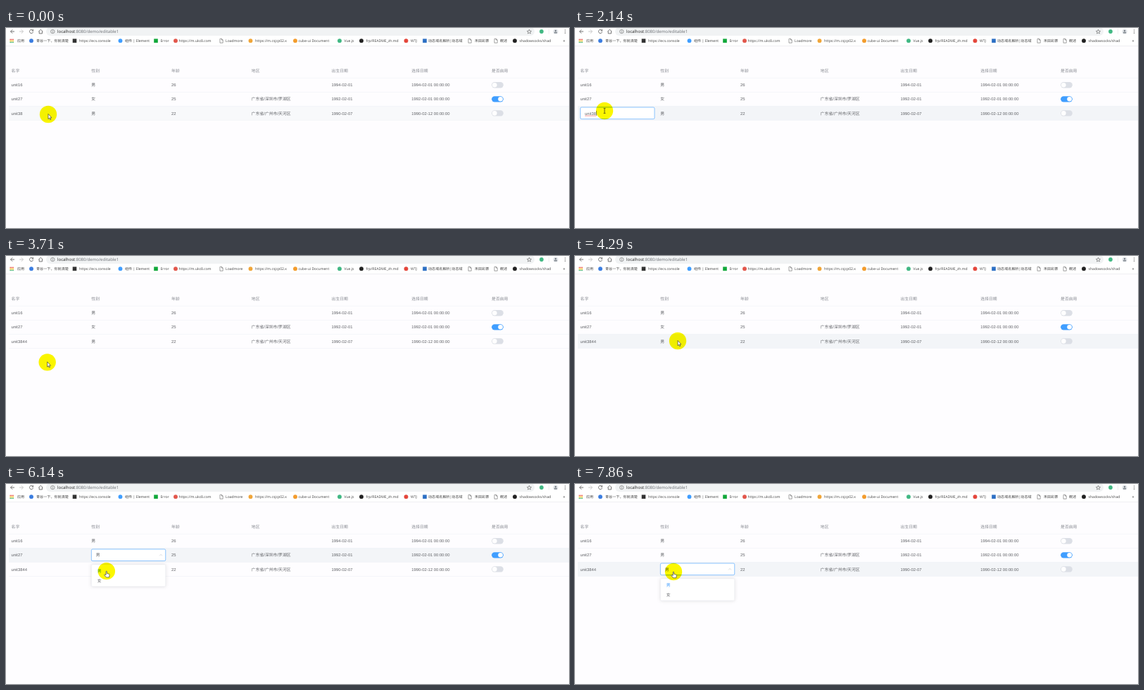
Recreate the animation shown at these times as an HTML page. Size 800 by 285 pixels, loop 8000 ms.

```html
<!DOCTYPE html>
<html lang="zh-CN">
<head>
<meta charset="utf-8">
<title>Editable table</title>
<style>
html, body { margin: 0; width: 100%; height: 100%; overflow: hidden; background: #fefdff; }
svg { display: block; width: 800px; height: 285px; }
text { text-rendering: geometricPrecision; white-space: pre; }
.cell { font: 5.83px "Liberation Sans", "Noto Sans CJK SC", "Noto Sans CJK", sans-serif; }
.bar { font: 5.1px "Open Sans", "Noto Sans CJK SC", "Noto Sans CJK", sans-serif; }
.url { font: 6px "Open Sans", sans-serif; }
</style>
</head>
<body>
<svg viewBox="0 0 800 285"><g id="chrome"></g><g id="page"></g></svg>
<script>
const INK = '#606266', BLUE = '#409eff', LINE = '#ebeef5', HOVER = '#f3f5f8';
const STEPS = 56, STEP = 1000 / 7;

const text = (x, y, s, fill = INK, cls = 'cell', extra = '') =>
  `<text x="${x}" y="${y}" class="${cls}" fill="${fill}" ${extra}>${s}</text>`;
const rect = (x, y, w, h, fill, extra = '') =>
  `<rect x="${x}" y="${y}" width="${w}" height="${h}" fill="${fill}" ${extra}/>`;
const circle = (x, y, r, fill, extra = '') =>
  `<circle cx="${x}" cy="${y}" r="${r}" fill="${fill}" ${extra}/>`;
const stroke = (d, color, width = 0.8) =>
  `<path d="${d}" fill="none" stroke="${color}" stroke-width="${width}"/>`;

// Bookmarks: icon x, icon shape, icon colour, label x, label
const bookmarks = [
  [36, 'dot', '#3b7de0', 43, '青谷一下，你就清楚'],
  [97.5, 'box', '#333', 104, 'https://ecs.console'],
  [162.5, 'dot', '#409eff', 169, '组件 | Element'],
  [213, 'box', '#12a83a', 219.5, 'Error'],
  [241, 'dot', '#e2574c', 245.5, 'https://m.ukc8.com'],
  [306, 'doc', '', 312, 'Loadmore'],
  [347.5, 'dot', '#f0a63a', 354, 'https://m.csjcp02.x'],
  [411, 'dot', '#f39c2d', 415.5, 'cube-ui Document'],
  [474, 'dot', '#41b883', 480.5, 'Vue.js'],
  [505, 'dot', '#222', 511.5, 'frp/README_zh.md'],
  [568.5, 'dot', '#e4473c', 575, 'WTJ'],
  [595, 'box', '#2c6fc4', 600, '动态域名解析|动态域'],
  [659, 'doc', '', 666, '禾田彩票'],
  [696, 'doc', '', 702, '概述'],
  [723, 'dot', '#222', 729.5, 'shadowsocks/shad'],
];

function icon(x, shape, color) {
  if (shape === 'dot') return circle(x, 18.2, 2.9, color);
  if (shape === 'box') return rect(x - 2.8, 15.4, 5.6, 5.6, color);
  return stroke(`M${x - 2} 15.4h2.6l1.6 1.6v4.2h-4.2zM${x + .5} 15.4v1.7h1.7`, '#666', .6);
}

function browser() {
  let s = rect(0, 0, 800, 26, '#fff') + rect(0, 25.5, 800, .6, '#e4e4e8');
  s += rect(57, -1, 694, 12, '#f1f3f4', 'rx="6"');
  s += stroke('M12 5H6.6M9.2 2.3L6.5 5L9.2 7.7', '#555');
  s += stroke('M19 5h5.4M21.8 2.3L24.5 5L21.8 7.7', '#bbb');
  s += stroke('M38 3.2A2.6 2.6 0 1 0 38.6 5.4M38.6 2v2h-2', '#555');
  s += stroke('M46.3 5L49.3 2.2L52.3 5M47.2 4.5v3.4h4.2V4.5', '#555');
  s += circle(66.3, 5, 2.7, 'none', 'stroke="#666" stroke-width=".6"') + stroke('M66.3 4.6v2M66.3 3.3v.7', '#666', .7);
  s += text(73, 7.1, 'localhost<tspan fill="#6a6e73">:8080/demo/editable1</tspan>', '#222', 'url');
  s += stroke('M743.5 2.2l.9 2 2.2.2-1.7 1.4.5 2.1-1.9-1.1-1.9 1.1.5-2.1-1.7-1.4 2.2-.2z', '#555', .6);
  s += circle(761, 5, 2.9, '#41b883') + rect(771, 1.5, .5, 7, '#ddd');
  s += circle(781, 5, 3.6, '#e3e6ea') + circle(781, 4, 1.3, '#7f868d') + rect(778.8, 5.8, 4.4, 1.8, '#7f868d', 'rx=".9"');
  for (const y of [2.8, 5, 7.2]) s += circle(794.5, y, .6, '#555');
  const dots = ['#ea4335', '#fbbc05', '#34a853'];
  for (let i = 0; i < 9; i++) s += rect(5.5 + i % 3 * 2, 15.7 + (i / 3 | 0) * 2, 1.4, 1.4, dots[(i / 3 | 0)]);
  s += text(16, 20.1, '应用', '#444', 'bar');
  for (const [x, shape, color, tx, label] of bookmarks) s += icon(x, shape, color) + text(tx, 20.1, label, '#444', 'bar');
  return s + text(791.5, 20, '»', '#444', 'url');
}

const colX = i => 7.6 + 113.75 * i;
const rowY = i => 81.2 + 20.1 * i;
const heads = ['名字', '性别', '年龄', '地区', '出生日期', '选择日期', '是否启用'];
const rows = [
  ['unit16', '男', '26', '', '1994-02-01', '1994-02-01 00:00:00'],
  ['unit27', '女', '25', '广东省/深圳市/罗湖区', '1992-02-01', '1992-02-01 00:00:00'],
  ['unit38', '男', '22', '广东省/广州市/天河区', '1990-02-07', '1990-02-12 00:00:00'],
];

// Timelines in steps: [start, value]
const hover = [[0, 2], [21, -1], [29, 2], [32, 1], [48, 2]];
const pointer = [[0, 'arrow'], [5, 'beam'], [21, 'arrow'], [36, 'hand'], [46, 'arrow'], [50, 'hand']];
const typed = [[0, 'unit38'], [20, 'unit384'], [21, 'unit3844']];
const caret = [[5, 1], [11, 0], [15, 1], [18, 0], [20, 1], [25, 0]];
const editor = [[0, ''], [5, 'name'], [25, ''], [36, 1], [46, ''], [49, 2]];
const clicks = [3, 4, 24, 35, 39, 42, 48];
const path = [[0, 60, 123], [2, 60, 123], [7, 42, 118], [19, 42, 118], [22, 60, 151], [24, 60, 156],
  [27, 58, 149], [30, 146, 121], [33, 152, 104], [38, 156, 104], [40, 155, 105], [42, 143, 124],
  [48, 142, 125], [55, 140, 125]];

const entry = (list, k) => list.filter(e => e[0] <= k).pop() || [0, 0];
const at = (list, k) => entry(list, k)[1];

function position(k) {
  const i = Math.max(1, path.findIndex(p => p[0] >= k));
  const [a, ax, ay] = path[i - 1], [b, bx, by] = path[i];
  const u = (k - a) / (b - a);
  return [ax + (bx - ax) * u, ay + (by - ay) * u];
}

const box = (x, y) => rect(x, y - 8.4, 105.4, 16.7, '#fff', `rx="1.7" stroke="${BLUE}" stroke-width=".6"`);

function toggle(y, on) {
  const x = colX(6);
  return rect(x, y - 4.1, 16.7, 8.3, on ? BLUE : '#dcdfe6', 'rx="4.15"') + circle(x + (on ? 12.5 : 4.2), y, 3.3, '#fff');
}

function nameInput(k) {
  const y = rowY(2), s = at(typed, k), w = s.length * 3.24 - 3.6;
  let out = box(colX(0), y) + text(14, y + 2.1, s);
  if (k < 20) {
    let d = 'M14 124.7';
    for (let i = 0; i < 8; i++) d += 'l1 .9l1-.9';
    out += stroke(d, '#f04040', .5);
  }
  return out + (at(caret, k) ? rect(14.5 + w, y - 3.4, .5, 7, '#333') : '');
}

function select(row, value, open) {
  const x = colX(1), y = rowY(row), d = open ? -1 : 1;
  return box(x, y) + text(x + 6.4, y + 2.1, value) +
    stroke(`M218.2 ${y - d}l1.9 ${2 * d}l1.9 ${-2 * d}`, '#c0c4cc', .6);
}

function dropdown(row, value, grow) {
  const x = colX(1), y = rowY(row) + 13.4;
  let s = rect(x, y, 105.4, 31.4, '#fff', 'rx="1.7" stroke="#e4e7ed" stroke-width=".5" style="filter:drop-shadow(0 .8px 2.5px rgba(0,0,0,.12))"');
  ['男', '女'].forEach((o, i) => {
    const on = o === value;
    s += text(x + 8.4, y + 11 + i * 14, o, on ? BLUE : INK, 'cell', on ? 'font-weight="700"' : '');
  });
  return `<g opacity="${grow}" transform="translate(0 ${y}) scale(1 ${grow}) translate(0 ${-y})">${s}</g>`;
}

const shapes = {
  arrow: '<path d="M0-.5v7.2l1.6-1.5 1.1 2.5 1.1-.5-1.1-2.4h2.2z" fill="#fff" stroke="#222" stroke-width=".6"/>',
  beam: stroke('M-1.4-3.6h1.1l.3.4.3-.4h1.1M0-3.3v6.6M-1.4 3.6h1.1l.3-.4.3.4h1.1', '#222', .7),
  hand: '<path d="M-.8 5V1q0-.9.7-.9t.7.9v2.3l3 .8q.8.3.7 1.2l-.6 3.5h-4L-2.9 5.9q-.5-.8.2-1.2t1.9.9z" fill="#fff" stroke="#222" stroke-width=".6"/>',
};

function page(k) {
  let s = '';
  const [since, hot] = entry(hover, k);
  if (hot >= 0) s += rect(4, rowY(hot) - 10, 796, 20, HOVER, `opacity="${Math.min(1, (k - since + 1) / 2)}"`);
  for (let i = 0; i < 4; i++) s += rect(4, rowY(i) - 10.3, 796, .5, LINE);
  heads.forEach((h, i) => s += text(colX(i), 63.2, h, '#85888f'));

  const gender = k >= 43 ? '男' : '女';
  rows.forEach((row, r) => {
    row.forEach((v, c) => {
      if (r === 2 && c === 0) v = at(typed, k);
      if (r === 1 && c === 1) v = gender;
      s += text(colX(c), rowY(r) + 2.1, v);
    });
    s += toggle(rowY(r), r === 1);
  });

  const mode = at(editor, k);
  if (mode === 'name') s += nameInput(k);
  else if (mode) {
    const value = mode === 1 ? gender : '男';
    const start = mode === 1 ? 40 : 50;
    const open = k >= start && (mode === 2 || k < 44);
    s += select(mode, value, open);
    if (open) s += dropdown(mode, value, Math.min(1, (k - start + 1) / 2));
  }

  const [x, y] = position(k);
  s += circle(x, y, 12.2, '#fbf700', 'style="mix-blend-mode:multiply"');
  if (clicks.includes(k)) s += circle(x, y, 2.5, 'none', 'stroke="#e8301c" stroke-width="1.3"');
  return s + `<g transform="translate(${x} ${y})">${shapes[at(pointer, k)]}</g>`;
}

const pageLayer = document.getElementById('page');
document.getElementById('chrome').innerHTML = browser();
let shown = -1;
function tick() {
  const k = Math.floor((performance.now() % 8000 + 5) / STEP) % STEPS;
  if (k !== shown) pageLayer.innerHTML = page(shown = k);
  requestAnimationFrame(tick);
}
tick();
</script>
</body>
</html>
```
